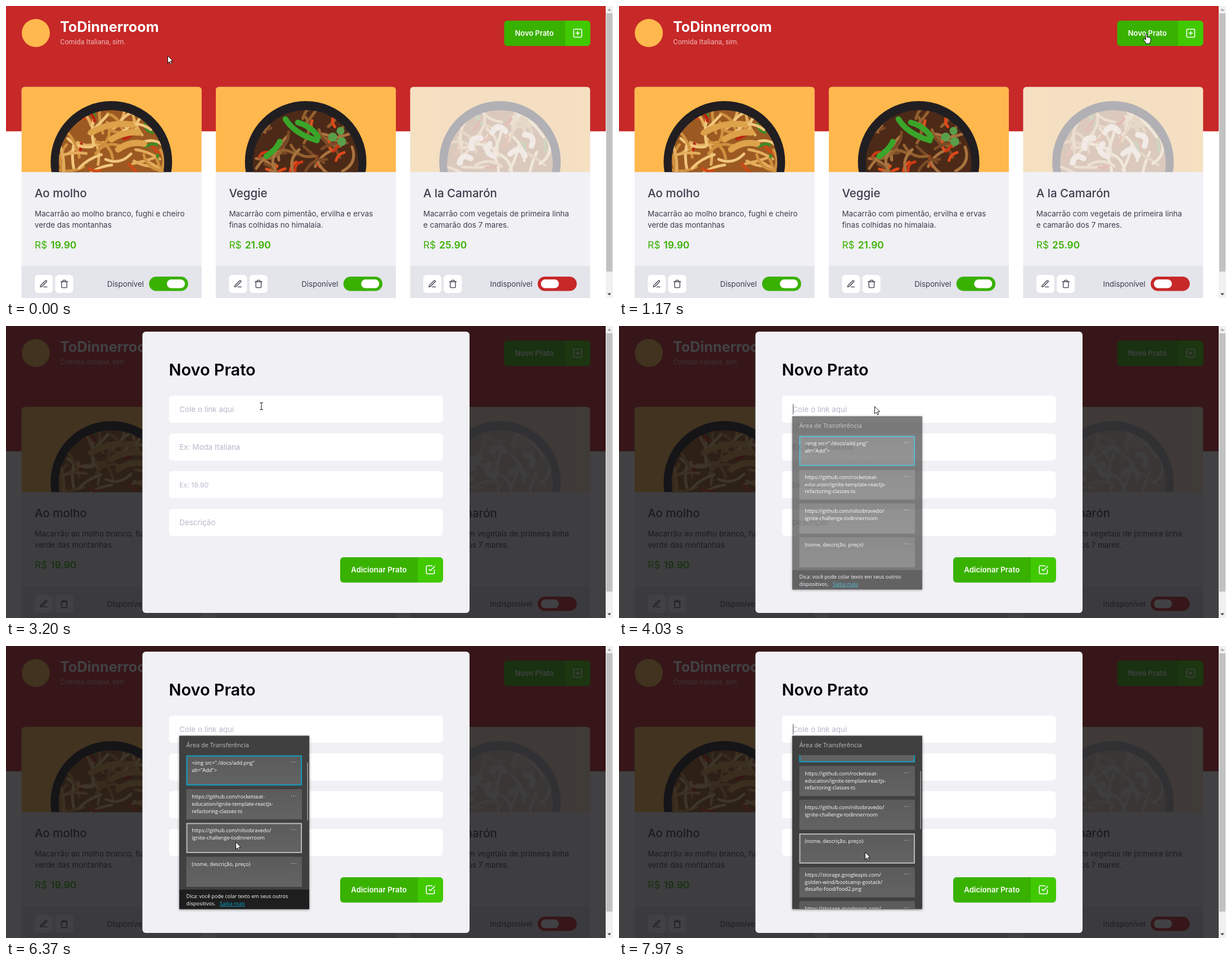
Recreate the animation shown at these times as an HTML page. Size 1079x519 px, loop 8 s.

```html
<!DOCTYPE html>
<html lang="pt">
<head>
<meta charset="utf-8">
<title>Novo Prato</title>
<style>
html, body { margin: 0; width: 100%; height: 100%; overflow: hidden; background: #fff; }
svg { display: block; width: 1079px; height: 519px; }
text { font-family: Inter, "Open Sans", sans-serif; white-space: pre; }
.sys text { font-family: "Open Sans", "Noto Sans", sans-serif; }
.line { fill: none; stroke-linecap: round; stroke-linejoin: round; }
</style>
</head>
<body>
<svg id="stage" viewBox="0 0 1079 519" xmlns="http://www.w3.org/2000/svg"></svg>
<script>
const LOOP = 8000, MODAL_AT = 1470, POPUP_AT = 3950, SCROLL_AT = 7615;
const GREEN = '#39b100', LIME = '#41c900', INK = '#3d3d4d', PANEL = '#f0f0f5';
const CARD = { x: 27.5, y: 143.6, w: 320.2, step: 345.4, photo: 151.7 };
const stage = document.getElementById('stage');

const rect = (x, y, w, h, fill, r = 0, extra = '') =>
  `<rect x="${x}" y="${y}" width="${w}" height="${h}" rx="${r}" fill="${fill}" ${extra}/>`;
const text = (x, y, str, size, fill, weight = 400, extra = '') =>
  `<text x="${x}" y="${y}" font-size="${size}" fill="${fill}" font-weight="${weight}" ${extra}>${str}</text>`;
const line = (d, stroke, width, extra = '') =>
  `<path class="line" d="${d}" stroke="${stroke}" stroke-width="${width}" ${extra}/>`;
const icon = (cx, cy, size, d, stroke) =>
  `<g transform="translate(${cx - size / 2} ${cy - size / 2}) scale(${size / 24})">${line(d, stroke, 2)}</g>`;

const ICONS = {
  plus: 'M5 3H19a2 2 0 0 1 2 2V19a2 2 0 0 1-2 2H5a2 2 0 0 1-2-2V5a2 2 0 0 1 2-2ZM12 8V16M8 12H16',
  check: 'M9 11l3 3L22 4M21 12v7a2 2 0 0 1-2 2H5a2 2 0 0 1-2-2V5a2 2 0 0 1 2-2h11',
  edit: 'M12 20h9M16.5 3.5a2.1 2.1 0 0 1 3 3L7 19l-4 1 1-4Z',
  trash: 'M3 6H21M19 6V20a2 2 0 0 1-2 2H7a2 2 0 0 1-2-2V6M8 6V4a2 2 0 0 1 2-2h4a2 2 0 0 1 2 2V6'
};

function randomizer(seed) {
  return () => (seed = (seed * 16807) % 2147483647) / 2147483647;
}

const dishes = [
  { name: 'Ao molho', price: '19.90', open: true, base: '#9c5a22',
    about: ['Macarrão ao molho branco, fughi e cheiro', 'verde das montanhas'],
    noodles: ['#e3ad5c', '#f0c67c', '#d0913f'], bits: ['#bd2410', '#3f8a25', '#cf4a18'],
    top: line('M-36-52Q0-72 36-66M0-40Q24-55 48-52M12-22Q34-38 58-32', '#dda24a', 11) },
  { name: 'Veggie', price: '21.90', open: true, base: '#4c2a17',
    about: ['Macarrão com pimentão, ervilha e ervas', 'finas colhidas no himalaia.'],
    noodles: ['#94602f', '#a9733f', '#7a4a26'], bits: ['#e0481b', '#c93a15', '#d9531e'],
    top: line('M-36-76Q-20-50 20-38M-14-70Q12-62 22-44M-70-10Q-52-22-46-36', '#3aa52a', 10) +
      '<g fill="#5a9e4a"><circle cx="48" cy="-44" r="8"/><circle cx="62" cy="-55" r="7"/><circle cx="64" cy="-36" r="8"/></g>' },
  { name: 'A la Camarón', price: '25.90', open: false, base: '#a8713a',
    about: ['Macarrão com vegetais de primeira linha', 'e camarão dos 7 mares.'],
    noodles: ['#e3bd82', '#f0d3a0', '#d2a562'], bits: ['#c4512c', '#7d9a45', '#d46a3a'],
    top: line('M-50-24q-4-22 16-18M-14-52q10-20 24-2M18-14q18-18 26 4M44-48q20 0 12 20M-72 2q4-18 20-8M-10-10q-20-6-8-22', '#f6dcc4', 10) }
];

function plate(dish, cx, index) {
  const rnd = randomizer(97 + index * 41);
  let strands = '';
  for (let i = 0; i < 48; i++) {
    const bit = i % 4 === 3;
    const angle = rnd() * Math.PI, length = bit ? 20 : 46, bend = (rnd() - 0.5) * length;
    const c = Math.cos(angle), s = Math.sin(angle);
    const x = (rnd() - 0.5) * 180 - c * length / 2, y = 20 - rnd() * 112 - s * length / 2;
    strands += line(`M${x} ${y}q${c * length / 2 - s * bend} ${s * length / 2 + c * bend} ${c * length} ${s * length}`,
      (bit ? dish.bits : dish.noodles)[Math.floor(i / 4) % 3], 5);
  }
  return `<g transform="translate(${cx} 277)"><circle r="108" fill="#211e22"/>
    <g clip-path="url(#food)"><circle cy="2" r="94" fill="${dish.base}"/>${strands}${dish.top}</g></g>`;
}

function card(dish, i) {
  const at = x => x + i * CARD.step, left = at(CARD.x);
  const tools = [[67, 'edit'], [103.5, 'trash']].map(([x, name]) =>
    rect(at(x - 16), 478, 32, 32, '#fff', 6) + icon(at(x), 494, 16, ICONS[name], INK)).join('');
  return `<g clip-path="url(#card${i})">` +
    rect(left, CARD.y, CARD.w, 376, PANEL) +
    `<g clip-path="url(#photos)" opacity="${dish.open ? 1 : 0.3}">` +
    rect(left, CARD.y, CARD.w, CARD.photo, '#ffb84d') + plate(dish, at(187.3), i) + '</g>' +
    rect(left, 462, CARD.w, 57, '#e4e4eb') + '</g>' +
    text(at(51), 340, dish.name, 20.5, INK, 500) +
    dish.about.map((s, n) => text(at(51), 374 + n * 19.7, s, 13.45, INK)).join('') +
    text(at(51), 431.3, 'R$', 17.4, GREEN) + text(at(79.3), 431.3, dish.price, 17.4, GREEN, 600) +
    tools +
    text(at(245), 498.5, dish.open ? 'Disponível' : 'Indisponível', 13.3, INK, 400, 'text-anchor="end"') +
    rect(at(254.3), 481, 69.5, 25.5, dish.open ? GREEN : '#c72828', 12.75) +
    rect(at(dish.open ? 286 : 260), 486, 32, 15.5, '#fff', 7.75);
}

function button(x, y, w, split, label, size, glyph) {
  const end = x + w;
  return rect(x, y, w, 45, GREEN, 6) +
    `<path d="M${split} ${y}H${end - 6}a6 6 0 0 1 6 6V${y + 39}a6 6 0 0 1-6 6H${split}Z" fill="${LIME}"/>` +
    text(x + 19.3, y + 27, label, size, '#fff', 600) + icon((split + end) / 2, y + 22.3, 19, ICONS[glyph], '#fff');
}

const clips = [
  ['<circle cy="2" r="94"/>', 'food'],
  [rect(0, CARD.y, 1066, CARD.photo, '#000'), 'photos'],
  ...dishes.map((_, i) => [rect(CARD.x + i * CARD.step, CARD.y, CARD.w, 400, '#000', 6.5), 'card' + i]),
  [rect(308, 194, 231, 239, '#000', 0, 'id="listBox"'), 'list'],
  [rect(308, 159.5, 231, 308, '#000'), 'popupBox']
].map(([shape, id]) => `<clipPath id="${id}">${shape}</clipPath>`).join('');

const page = rect(0, 0, 1079, 519, '#fff') + rect(0, 0, 1066, 222.7, '#c72828') +
  '<circle cx="53" cy="48" r="25" fill="#ffb84d"/>' +
  text(96, 46, 'ToDinnerroom', 25.2, '#fff', 700) +
  text(96.3, 68, 'Comida Italiana, sim.', 12.5, '#f0b9b9', 400, 'style="font-family:Roboto,sans-serif"') +
  button(885.5, 26, 153, 994, 'Novo Prato', 12.9, 'plus') + dishes.map(card).join('');

const scrollbar = rect(1066, 0, 13, 519, '#f1f1f1') + rect(1067, 13, 11, 459, '#c1c1c1') +
  '<path d="M1069 8.5l3.5-4 3.5 4Z" fill="#a3a3a3"/><path d="M1069 510.5l3.5 4 3.5-4Z" fill="#505050"/>';

const fields = ['Cole o link aqui', 'Ex: Moda Italiana', 'Ex: 19.90', 'Descrição'];
const modal = rect(0, 0, 1066, 519, '#121214', 0, 'opacity=".8"') + rect(242.5, 10, 581.5, 500, PANEL, 6) +
  text(289.5, 88, 'Novo Prato', 28.9, '#000', 600) +
  fields.map((s, i) => rect(289.7, 123.7 + i * 67.2, 487, 48.3, '#fff', 6) +
    text(308.3, 152.6 + i * 67.2, s, i === 2 ? 12.2 : 13.4, '#b7b7cc')).join('') +
  button(594, 411, 182.7, 732, 'Adicionar Prato', 13.3, 'check') +
  rect(309, 138.5, 1, 18.5, '#555', 0, 'id="caret"');

const snippets = [
  ['&lt;img src="./docs/add.png"', 'alt="Add"&gt;'],
  ['https://github.com/rocketseat-', 'education/ignite-template-reactjs-', 'refactoring-classes-ts'],
  ['https://github.com/nilsobravedo/', 'ignite-challenge-todinnerroom'],
  ['(nome, descrição, preço)'],
  ['https://storage.googleapis.com/', 'golden-wind/bootcamp-gostack/', 'desafio-food/food2.png'],
  ['https://storage.googleapis.com/']
];
const ITEM_TOP = 194.5, ITEM_STEP = 60, ITEM_HEIGHT = 53.5;
const snippet = (lines, i) => {
  const y = ITEM_TOP + i * ITEM_STEP;
  return rect(320.5, y, 205.5, ITEM_HEIGHT, 'url(#tile)') +
    rect(321.5, y + 1, 203.5, ITEM_HEIGHT - 2, 'none', 0, 'class="edge" stroke-width="2"') +
    lines.map((s, n) => text(330.3, y + 16.7 + n * 12.7, s, 9.15, '#fff')).join('') +
    [507.5, 511.3, 515.1].map(x => `<circle cx="${x}" cy="${y + 12}" r=".75" fill="#c4c4c4"/>`).join('');
};

const popup = rect(308, 159.5, 231, 308, '#404040', 0, 'filter="url(#shade)"') +
  text(320.6, 180, 'Área de Transferência', 11, '#bdbdbd') +
  `<g clip-path="url(#list)"><g id="items">${snippets.map(snippet).join('')}</g></g>` +
  rect(535.5, 207, 1.5, 103, '#9a9a9a', 0, 'id="thumb"') +
  '<g clip-path="url(#popupBox)"><g id="tip">' + rect(308, 433, 231, 35, '#1e1e1e') +
  text(320.6, 448, 'Dica: você pode colar texto em seus outros', 9.05, '#fff') +
  text(320.6, 461.3, 'dispositivos.', 9.05, '#fff') +
  text(379.8, 461.3, 'Saiba mais', 9.05, '#0aa5cc', 400, 'text-decoration="underline"') + '</g></g>';

const pointers = `
  <path id="arrow" d="M.5.5V13.6L3.6 10.7 5.7 15.4 7.7 14.5 5.7 9.9H9.6Z" fill="#fff" stroke="#000" stroke-width=".9"/>
  <path id="hand" d="M-.8 11V1.6a1.3 1.3 0 0 1 2.6 0V6.5q1.2-1 2.3.3 1.3-.8 2.2.6 1.9-.5 1.9 1.6V12q-.2 2.5-1.4 4V18H-.4V16.6L-4.8 11q-.8-1.8 1-1.9Z" fill="#fff" stroke="#000" stroke-width="1"/>
  <path id="beam" class="line" d="M-2.5-6.2Q-.5-6.2 0-5.4 .5-6.2 2.5-6.2M0-5.4V5.4M-2.5 6.2Q-.5 6.2 0 5.4 .5 6.2 2.5 6.2" stroke="#222" stroke-width="1.1"/>`;

stage.innerHTML = `<defs>${clips}
  <linearGradient id="tile" x1="0" y1="0" x2="0" y2="1"><stop stop-color="#5b5b5b"/><stop offset="1" stop-color="#636363"/></linearGradient>
  <filter id="shade" x="-10%" y="-10%" width="120%" height="120%"><feDropShadow dx="0" dy="1" stdDeviation="2" flood-opacity=".5"/></filter></defs>
  ${page}<g id="modal">${modal}</g>${scrollbar}<g id="popup" class="sys">${popup}</g><g id="pointer">${pointers}</g>`;

const el = Object.fromEntries([...stage.querySelectorAll('[id]')].map(node => [node.id, node]));
const edges = [...stage.querySelectorAll('.edge')];

// start, end, then a curve: from, control, to
const moves = [
  [30, 830, 287, 88, 620, 455, 914, 101],
  [870, 1170, 914, 101, 885, 72, 937, 49],
  [1970, 2670, 937, 49, 700, 60, 454, 138],
  [2900, 2970, 454, 138, 454, 140, 454, 142.5],
  [4270, 4810, 454, 142.5, 430, 230, 395, 262],
  [4840, 5000, 395, 262, 396, 266, 397, 270],
  [5100, 5700, 397, 270, 400, 310, 408, 348],
  [6870, 7470, 408, 348, 425, 360, 433, 379],
  [7640, 7970, 433, 379, 436, 372, 437, 366]
];
const clamp = v => Math.max(0, Math.min(1, v));
const show = (node, on) => node.setAttribute('display', on ? 'inline' : 'none');
const shift = (node, x, y) => node.setAttribute('transform', `translate(${x} ${y})`);

function pointerAt(t) {
  const [t0, t1, ax, ay, bx, by, cx, cy] = moves.findLast(m => t >= m[0]) || moves[0];
  const p = clamp((t - t0) / (t1 - t0)), u = p * p * (3 - 2 * p), v = 1 - u;
  return [v * v * ax + 2 * u * v * bx + u * u * cx, v * v * ay + 2 * u * v * by + u * u * cy];
}

function draw(t) {
  const [x, y] = pointerAt(t);
  const modalOpen = t >= MODAL_AT, popupOpen = t >= POPUP_AT;
  const overField = modalOpen && !popupOpen && x > 290 && x < 777 && y > 124 && y < 172;
  const overButton = !modalOpen && x > 886 && y > 26 && y < 71;
  shift(el.pointer, x, y);
  show(el.beam, overField);
  show(el.hand, overButton);
  show(el.arrow, !overField && !overButton);

  show(el.modal, modalOpen);
  show(el.caret, t < 2133 || Math.floor((t - 3200) / 528) % 2 !== 0);

  const enter = clamp((t - POPUP_AT + 20) / 150);
  show(el.popup, popupOpen);
  el.popup.setAttribute('opacity', enter);
  shift(el.popup, 0, 8 * (1 - enter) ** 2);

  const glide = clamp((t - 7630) / 340);
  const scroll = t < SCROLL_AT ? 0 : 12.6 + 28.7 * glide * (2 - glide);
  shift(el.items, 0, -scroll);
  shift(el.thumb, 0, scroll * 0.37);
  show(el.thumb, t >= 4300);
  const tipDrop = 35 * clamp((t - 7720) / 160);
  shift(el.tip, 0, tipDrop);
  el.listBox.setAttribute('height', 239 + Math.min(34.5, tipDrop));

  edges.forEach((edge, i) => {
    const top = ITEM_TOP + i * ITEM_STEP - scroll;
    const hovered = x > 320 && x < 526 && y >= top && y <= top + ITEM_HEIGHT;
    edge.setAttribute('stroke', i === 0 ? '#0f9dbd' : hovered ? '#b8b8b8' : 'none');
  });
}

const start = performance.now();
function tick() {
  draw((performance.now() - start) % LOOP);
  requestAnimationFrame(tick);
}
tick();
</script>
</body>
</html>
```
